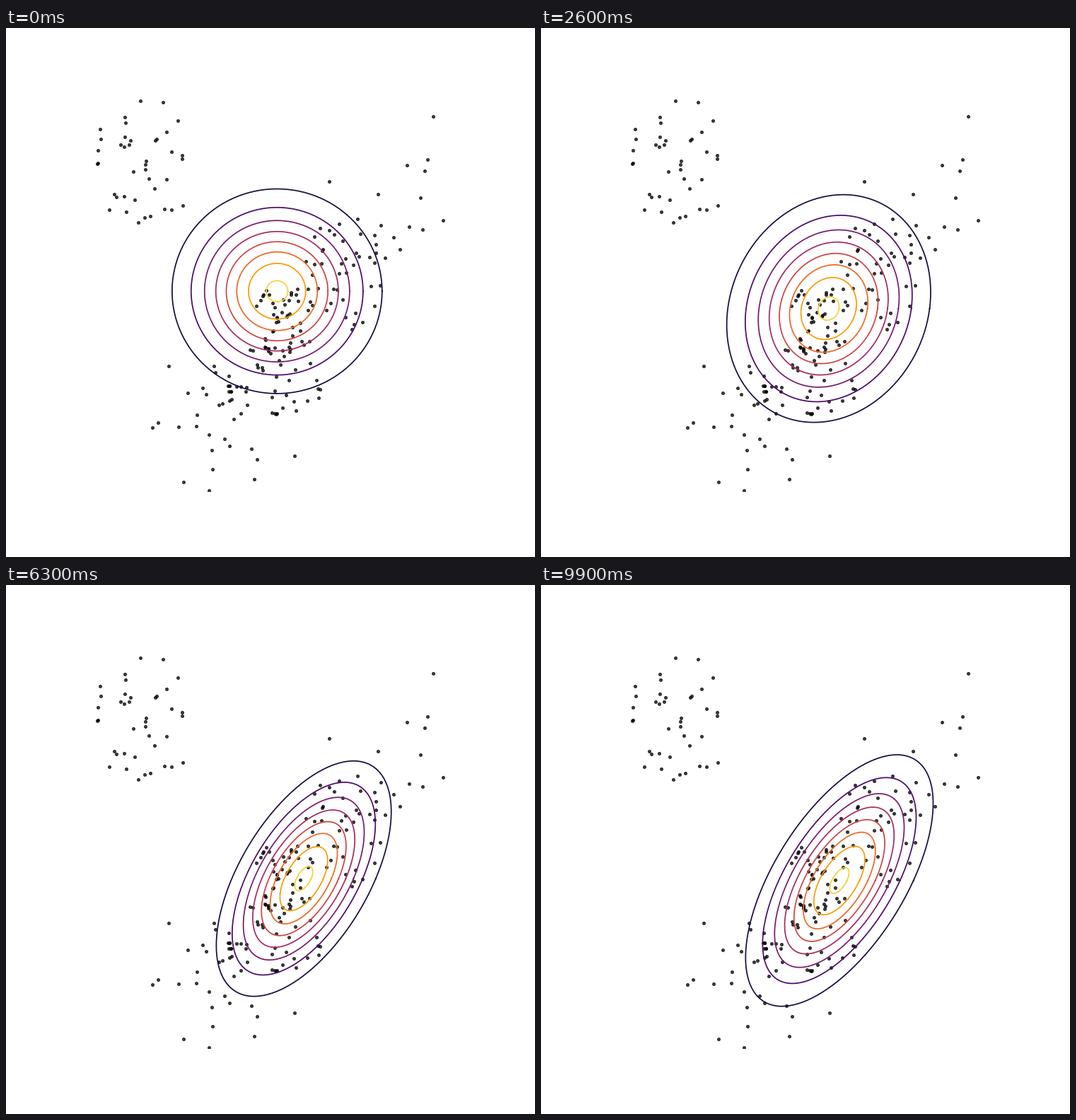
Animation, 748 px wide and 748 px high, one loop 10 s. Source, as a matplotlib script:

```python
import numpy as np
import matplotlib.pyplot as plt
from matplotlib.animation import FuncAnimation

SIZE, DPI, FRAMES, STEP = 748, 100, 100, 100

# Point clouds in pixels: centre x, y, radius x, y, count
CLOUDS = [
    (193, 196, 72, 100, 40),
    (480, 340, 60, 90, 44),
    (392, 413, 48, 52, 46),
    (362, 500, 88, 56, 42),
    (300, 568, 90, 60, 14),
    (555, 270, 36, 60, 7),
    (316, 510, 4, 5, 6),
    (381, 545, 2, 1, 3),
]
LONERS = [(604, 125), (596, 186), (567, 194), (592, 202), (618, 272),
          (457, 217), (230, 478), (207, 565), (251, 642), (287, 654),
          (351, 638), (408, 605)]


def scatter_cloud(rng, cx, cy, rx, ry, n):
    """Random points spread evenly over an ellipse."""
    r = np.sqrt(rng.random(n))
    a = rng.uniform(0, 2 * np.pi, n)
    return np.column_stack([cx + rx * r * np.cos(a), cy + ry * r * np.sin(a)])


def sigmoid(t, mid, width):
    return 1 / (1 + np.exp((mid - t) / width))


def settle(t, reach, speed, sharp):
    """Move at constant speed, then level off at reach."""
    x = speed * t / reach
    return reach * x / (1 + x**sharp) ** (1 / sharp)


def pose(t):
    """Centre, half height, shear and cross width of the outer ellipse."""
    cx = 383.3 + settle(t, 38.7, 0.92, 5)
    cy = 372.2 + settle(t, 46.3, 0.96, 4)
    tilt = sigmoid(t, 31, 6.5)
    height = 144.7 + 18.3 * (1 - np.exp(-t / 12)) + 16 * sigmoid(t, 75, 9.5)
    shear = (65 * tilt + 18 * sigmoid(t, 72, 12)
             - 6 * np.exp(-((t - 12) / 8) ** 2))
    width = (162.5 - 62 * tilt - 13.5 * np.exp(-t / 6)
             + 4.5 * sigmoid(t, 75, 8))
    return cx, cy, height, shear, width


rng = np.random.default_rng(7)
points = np.vstack([LONERS] + [scatter_cloud(rng, *c) for c in CLOUDS])

fig = plt.figure(figsize=(SIZE / DPI, SIZE / DPI), dpi=DPI, facecolor="white")
ax = fig.add_axes([0.125, 0.125, 0.75, 0.75])
ax.set_xlim(SIZE * 0.125, SIZE * 0.875)
ax.set_ylim(SIZE * 0.875, SIZE * 0.125)
ax.axis("off")
ax.plot(*points.T, "k.", markersize=5.4, alpha=0.7, zorder=1)

# Evenly spaced density levels of a Gaussian, outermost radius = 1
PEAK = 8.18
LEVELS = np.arange(1, 9)
RADII = np.sqrt(np.log(PEAK / LEVELS) / np.log(PEAK))
lines = [ax.plot([], [], color=plt.cm.inferno(k / 9), lw=1.25, zorder=3)[0]
         for k in LEVELS]
angle = np.linspace(0, 2 * np.pi, 241)


def update(frame):
    cx, cy, height, shear, width = pose(frame)
    dx = shear * np.sin(angle) + width * np.cos(angle)
    dy = height * np.sin(angle)
    for line, r in zip(lines, RADII):
        line.set_data(cx + r * dx, cy - r * dy)
    return lines


anim = FuncAnimation(fig, update, frames=FRAMES, interval=STEP,
                     repeat=True, repeat_delay=0, blit=False)
plt.show()
```
